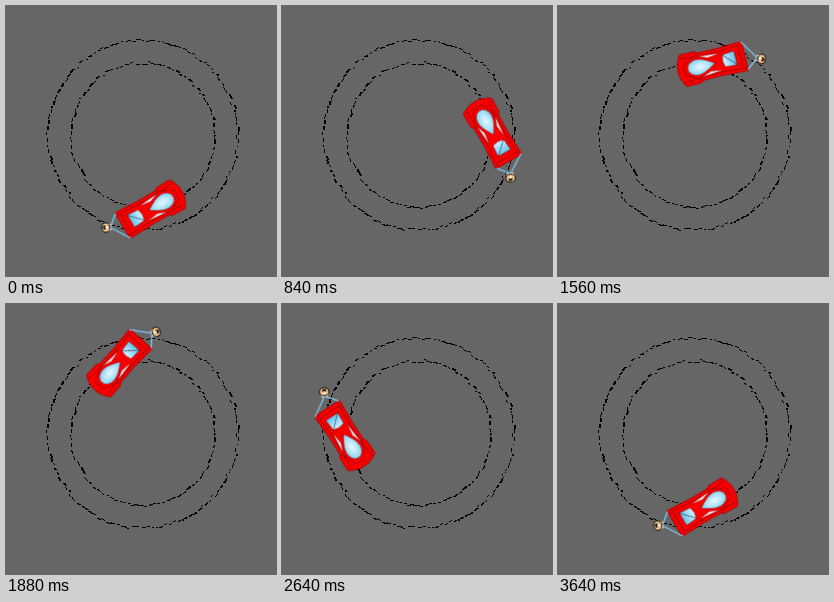
An HTML page with a canvas for the animation above (3680 ms loop, 270 by 270 pixels).

```html
<!DOCTYPE html>
<html lang="en">
<head>
<meta charset="utf-8">
<title>Drifting car</title>
<style>
  html, body { margin: 0; width: 100%; height: 100%; overflow: hidden; background: #666; }
  canvas, svg { position: absolute; left: 0; top: 0; width: 100%; height: 100%; display: block; }

  /* orbit angle, orbit radius, car heading relative to the orbit */
  #car { animation: drift 3680ms -1ms infinite; }
  @keyframes drift {
    0%       { transform: translate(136.5px, 129px) rotate(83deg) translateX(74.5px) rotate(-113deg); animation-timing-function: steps(13); }
    14.1304% { transform: translate(136.5px, 129px) rotate(31.1deg) translateX(73.8px) rotate(-116.6deg); animation-timing-function: steps(15); }
    30.4348% { transform: translate(136.5px, 129px) rotate(-31.2deg) translateX(73.8px) rotate(-118.3deg); animation-timing-function: steps(11); }
    42.3913% { transform: translate(136.5px, 129px) rotate(-76deg) translateX(73.4px) rotate(-117.5deg); animation-timing-function: steps(16); }
    59.7826% { transform: translate(136.5px, 129px) rotate(-142.3deg) translateX(73px) rotate(-120.5deg); animation-timing-function: steps(23); }
    84.7826% { transform: translate(136.5px, 129px) rotate(-227deg) translateX(74px) rotate(-119.5deg); animation-timing-function: steps(13); }
    98.913%, 100% { transform: translate(136.5px, 129px) rotate(-277deg) translateX(74.5px) rotate(-113deg); }
  }
</style>
</head>
<body>
<canvas id="track" width="270" height="270"></canvas>
<svg viewBox="0 0 270 270">
  <defs>
    <radialGradient id="glass" cx=".55" cy=".5" r=".6">
      <stop offset="0" stop-color="#e8f8ff"/>
      <stop offset=".5" stop-color="#b0e4f8"/>
      <stop offset="1" stop-color="#68c0e8"/>
    </radialGradient>
    <linearGradient id="rear">
      <stop offset="0" stop-color="#60c4f0"/>
      <stop offset="1" stop-color="#d4f2ff"/>
    </linearGradient>
  </defs>
  <!-- nose points along +x -->
  <g id="car" stroke-linejoin="round">
    <path d="M-33.5 -15L-8 -13.8L12 -14L15 -16L30 -16.2L32 -13L35 -5V5L32 13L30 16.2L15 16L12 14L-8 13.8L-33.5 15Z"
          fill="#f80000" stroke="#b00000" stroke-width=".9"/>
    <g fill="none" stroke="#a00000" stroke-width=".9">
      <path d="M12 -14L17 -11L31 -12.5M12 14L17 11L31 12.5"/>
      <path d="M-33 -12L-9 -10.5L17 -11M-33 12L-9 10.5L17 11"/>
      <path d="M17 -11L29 -5V5L17 11M-29 -11V11"/>
    </g>
    <path d="M-9 -8.5L12 -10.5L3 -7ZM-9 8.5L12 10.5L3 7Z" fill="#f0faff" stroke="#700" stroke-width=".3"/>
    <path d="M-3 0C3 -3.5 9 -8 16 -8C22 -7 25 -4 25 0C25 4 22 7 16 8C9 8 3 3.5 -3 0Z"
          fill="url(#glass)" stroke="#900000" stroke-width=".6"/>
    <path d="M-24 -7L-12 -6Q-9.5 0 -12 6.5L-24 7.5Z" fill="url(#rear)" stroke="#900000" stroke-width=".6"/>
    <path d="M-25 -7.5L-11 7" fill="none" stroke="#302028" stroke-width=".8"/>
    <path d="M-33.5 -14L-45 -4.5L-32.5 15" fill="none" stroke="#80ccfc" stroke-width="1.2"/>
    <g transform="translate(-49 -6.8) rotate(25)">
      <path d="M1 -3.5L5.5 -2M1 3.5L5.5 2" stroke="#f4cca0" stroke-width="1.6"/>
      <ellipse rx="3.9" ry="4.7" fill="#f4c890" stroke="#181008"/>
      <circle cx="-.7" r="2" fill="#100800"/>
      <circle cx=".8" r="1.5" fill="#fff0d8"/>
    </g>
  </g>
</svg>
<script>
  const ctx = document.getElementById('track').getContext('2d');
  let seed = 17;
  const rand = () => (seed = (seed * 16807) % 2147483647) / 2147483647;

  // tyre mark made of short, slightly wobbling dashes
  function ring(radius) {
    let a = 0;
    while (a < Math.PI * 2) {
      const r = radius + (rand() + rand() - 1) * 1.8;
      const end = a + (1 + rand() * 3.5) / radius;
      const size = rand() < 0.45 ? 2 : 1;
      for (; a < end; a += 0.8 / radius) {
        const x = Math.floor(136.8 + r * Math.cos(a));
        const y = Math.floor(129.2 + r * Math.sin(a));
        ctx.fillRect(x, y, size, 1);
      }
      a += (0.6 + rand() * 2.6) / radius;
    }
  }

  ctx.fillStyle = '#000';
  ring(95);
  ring(72);
</script>
</body>
</html>
```
